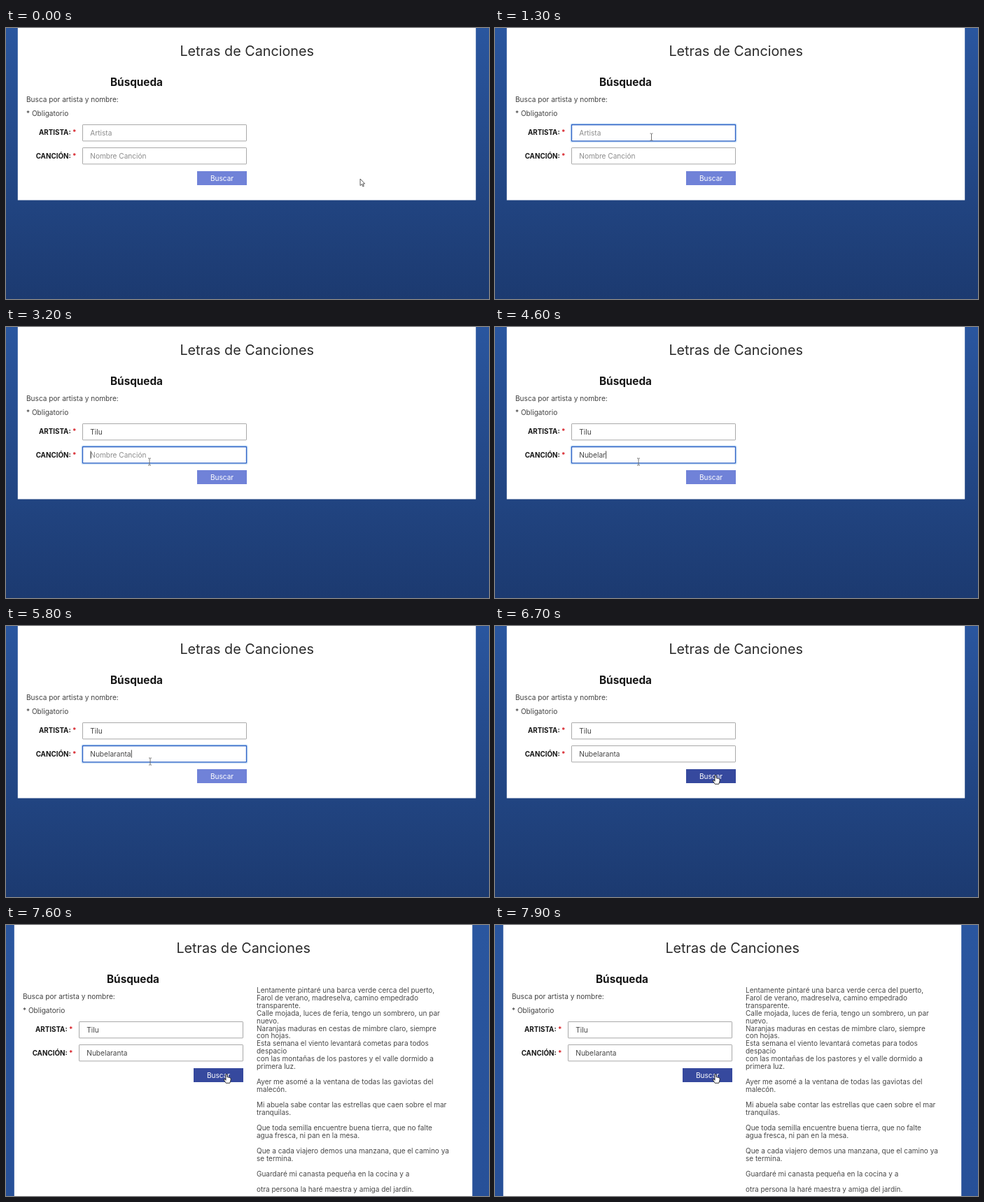
Write an HTML page that moves like this. It is 690 px wide and 388 px high and loops after 8 s.

```html
<!DOCTYPE html>
<html lang="es">
<head>
<meta charset="utf-8">
<title>Letras de Canciones</title>
<style>
  html, body { margin: 0; width: 100%; height: 100%; overflow: hidden; background: #1c3a70; }
  svg { display: block; width: 690px; height: 388px; }
  text { font-family: Inter, "Open Sans", sans-serif; font-size: 10.1px; fill: #404040; white-space: pre; }
  .title { font-size: 19.75px; fill: #2b2b2b; text-anchor: middle; }
  .heading { font-size: 15.3px; font-weight: 700; fill: #161616; text-anchor: middle; }
  .label { font-size: 9.8px; font-weight: 700; fill: #161616; text-anchor: end; }
  .label tspan { fill: #d8232a; }
  .button { fill: #fff; text-anchor: middle; }
  .lyric { font-size: 10px; fill: #484848; }
</style>
</head>
<body>
<svg viewBox="0 0 690 388" xmlns="http://www.w3.org/2000/svg">
  <defs>
    <linearGradient id="sky" gradientUnits="userSpaceOnUse" x1="0" y1="0" x2="0" y2="388">
      <stop offset="0" stop-color="#2a569f"/>
      <stop id="skyEnd" offset="1" stop-color="#1c3a70"/>
    </linearGradient>
  </defs>
  <rect width="690" height="388" fill="url(#sky)"/>
  <g id="page">
    <rect id="panel" x="16.8" y="0" width="654.4" height="246.5" fill="#fff"/>
    <text class="title" x="344.2" y="40">Letras de Canciones</text>
    <text class="heading" x="186.5" y="82.5">Búsqueda</text>
    <text x="29" y="106">Busca por artista y nombre:</text>
    <text x="29" y="126.3">* Obligatorio</text>
    <text class="label" x="100.5" y="153.3">ARTISTA: <tspan>*</tspan></text>
    <text class="label" x="100.5" y="186.8">CANCIÓN: <tspan>*</tspan></text>
    <g id="fields"></g>
    <rect id="button" x="273" y="205" width="71" height="20"/>
    <text class="button" x="308.5" y="218.6">Buscar</text>
    <g id="lyrics"></g>
  </g>
  <path id="arrow" d="M0 0V9.6L2.3 7.5L3.9 11L5.3 10.4L3.8 7H6.6Z" fill="#fff" stroke="#333" stroke-width=".8"/>
  <path id="beam" d="M-2 -5H-.6L0 -4.4L.6 -5H2M0 -4.4V4.4M-2 5H-.6L0 4.4L.6 5H2" fill="none" stroke="#666" stroke-width=".9"/>
  <path id="hand" d="M-1 .6Q0 -.6 1 .6V4.4L2.8 4.7L4.5 5.2L6 6Q6.5 8 5.7 10L4.8 13H-.8L-3.6 8.7Q-3.8 7.2 -2.4 7.5L-1 9Z" fill="#fff" stroke="#222" stroke-width=".9" stroke-linejoin="round"/>
</svg>
<script>
const LOOP = 8000, STEP = 100;
const BLUR = 6300, HOVER = 6200, RESULT = 7600;
const $ = id => document.getElementById(id);

function add(parent, tag, attrs, text = "") {
  const node = document.createElementNS("http://www.w3.org/2000/svg", tag);
  for (const key in attrs) node.setAttribute(key, attrs[key]);
  node.textContent = text;
  parent.appendChild(node);
  return node;
}

const fields = [
  { y: 138.5, hint: "Artista", value: "Tilu", focus: 700, blur: 2900,
    keys: [1900, 2100, 2300, 2400] },
  { y: 171.5, hint: "Nombre Canción", value: "Nubelaranta", focus: 2900, blur: BLUR,
    keys: [3700, 3800, 4000, 4100, 4300, 4400, 4600, 4700, 4900, 5100, 5300] }
];

for (const field of fields) {
  const box = { x: 109.5, y: field.y, width: 234, height: 23.3, rx: .6 };
  field.glow = add($("fields"), "rect", { ...box, fill: "none", stroke: "#cbe2f8", "stroke-width": 4 });
  field.box = add($("fields"), "rect", { ...box, fill: "#fff" });
  field.text = add($("fields"), "text", { x: 120.3, y: field.y + 15 });
  field.caret = add($("fields"), "rect", { y: field.y + 6, width: .9, height: 11, fill: "#333" });
}

// A blank entry leaves one empty row.
const lyrics = [
  "Lentamente pintaré una barca verde cerca del puerto,",
  "Farol de verano, madreselva, camino empedrado",
  "transparente.",
  "Calle mojada, luces de feria, tengo un sombrero, un par",
  "nuevo.",
  "Naranjas maduras en cestas de mimbre claro, siempre",
  "con hojas.",
  "Esta semana el viento levantará cometas para todos",
  "despacio",
  "con las montañas de los pastores y el valle dormido a",
  "primera luz.", "",
  "Ayer me asomé a la ventana de todas las gaviotas del",
  "malecón.", "",
  "Mi abuela sabe contar las estrellas que caen sobre el mar",
  "tranquilas.", "",
  "Que toda semilla encuentre buena tierra, que no falte",
  "agua fresca, ni pan en la mesa.", "",
  "Que a cada viajero demos una manzana, que el camino ya",
  "se termina.", "",
  "Guardaré mi canasta pequeña en la cocina y a", "",
  "otra persona la haré maestra y amiga del jardín."
];
lyrics.forEach((line, row) =>
  add($("lyrics"), "text", { class: "lyric", x: 363, y: 96.7 + row * 10.96 }, line));

// Pointer hot spot: time, x, y
const path = [
  [0, 506, 216], [700, 223.5, 156], [2650, 223.5, 156], [2900, 205, 193],
  [5550, 205, 193], [5700, 206, 194], [5800, 206, 194], [6300, 315, 213.3]
];
const clamp = v => Math.max(0, Math.min(1, v));
const ease = v => v * v * (3 - 2 * v);
const mix = (a, b, v) => a + (b - a) * v;
const show = (node, on) => node.setAttribute("visibility", on ? "visible" : "hidden");

function pointerAt(t) {
  const i = path.findIndex(p => p[0] > t);
  if (i < 0) return path[path.length - 1].slice(1);
  const [a, b] = [path[i - 1], path[i]];
  const v = ease((t - a[0]) / (b[0] - a[0]));
  return [mix(a[1], b[1], v), mix(a[2], b[2], v)];
}

function drawField(field, t) {
  const focused = t >= field.focus && t < field.blur;
  const typed = field.keys.filter(k => k <= t).length;
  const lastInput = typed ? field.keys[typed - 1] : field.focus;
  field.text.textContent = typed ? field.value.slice(0, typed) : field.hint;
  field.text.style.fill = typed ? "#444" : "#8c8c8c";
  field.box.setAttribute("stroke", focused ? "#2a5fc4" : "#a9a9a9");
  field.box.setAttribute("stroke-width", focused ? 1.3 : 1);
  show(field.glow, focused);
  show(field.caret, focused && (t - lastInput) % 1060 < 530);
  field.caret.setAttribute("x", 120.6 + (typed ? field.text.getComputedTextLength() : 0));
}

function drawPointer(t) {
  const [x, y] = pointerAt(t);
  const inside = x > 109 && x < 345;
  const overField = inside && fields.some(f => y > f.y && y < f.y + 23.5);
  const overButton = x > 273 && x < 344 && y > 205 && y < 225;
  const shape = overButton ? "hand" : overField ? "beam" : "arrow";
  for (const id of ["arrow", "beam", "hand"]) show($(id), id === shape);
  $(shape).setAttribute("transform", `translate(${x} ${y})`);
}

function draw(t) {
  const found = t >= RESULT;
  fields.forEach(f => drawField(f, t));
  const v = clamp((t - HOVER) / 300);
  const tone = [[112, 130, 216], [54, 73, 158]];
  $("button").setAttribute("fill", `rgb(${tone[0].map((c, i) => Math.round(mix(c, tone[1][i], v)))})`);
  $("page").setAttribute("transform", `translate(${found ? -5 : 0} 0)`);
  $("panel").setAttribute("height", found ? 388 : 246.5);
  $("skyEnd").setAttribute("stop-color", found ? "#275098" : "#1c3a70");
  show($("lyrics"), found);
  drawPointer(t);
}

const start = performance.now();
function tick() {
  const t = (performance.now() - start) % LOOP;
  draw(Math.floor(t / STEP) * STEP);
  requestAnimationFrame(tick);
}
tick();
</script>
</body>
</html>
```
